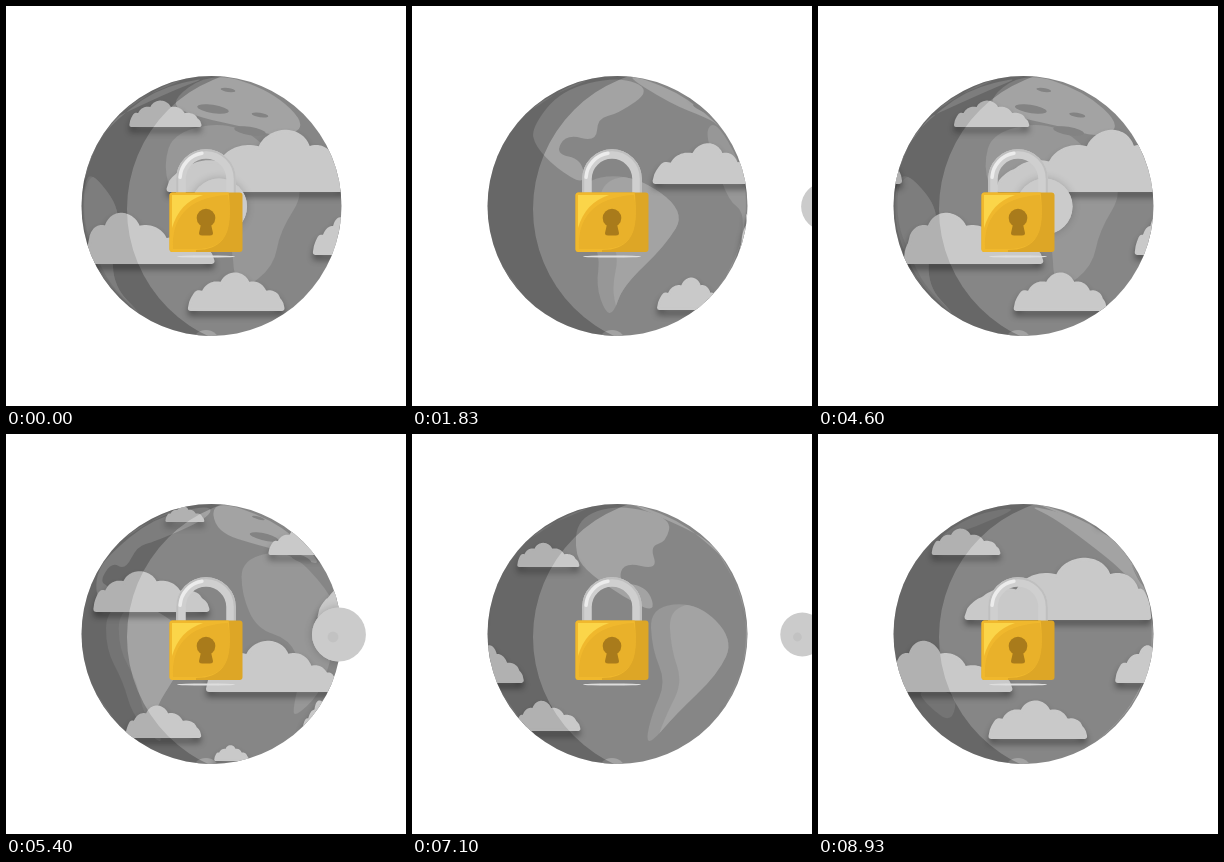
Write an HTML page with a canvas that moves like this. It is 400 by 400 pixels and loops after 9.01 s.

```html
<!DOCTYPE html>
<html lang="en">
<head>
<meta charset="utf-8">
<title>Locked globe</title>
<style>
html, body { margin: 0; width: 100%; height: 100%; overflow: hidden; background: #fff; }
canvas { display: block; width: 400px; height: 400px; }
</style>
</head>
<body>
<canvas id="stage"></canvas>
<script>
const canvas = document.getElementById('stage');
const ctx = canvas.getContext('2d');
const ratio = window.devicePixelRatio || 1;
canvas.width = canvas.height = 400 * ratio;

const LOOP = 9010, TURN = 4.505;
const CX = 205.5, CY = 200, R = 130;
const LAND_SPEED = 41.5, CLOUD_SPEED = 77; // degrees per second
const CLOUD_WRAP = CLOUD_SPEED * TURN;
const RAD = Math.PI / 180;
const OCEAN = '#868686', SEA = '#838383', LAND = '#979797', LAND_LIGHT = '#a3a3a3';

const clamp = (v, lo, hi) => Math.max(lo, Math.min(hi, v));

// Half width of the globe at a height; clouds float on a flatter, wider shell.
const landChord = y => Math.sqrt(Math.max(1, R * R - (y - CY) ** 2));
const cloudChord = y => 10 + Math.sqrt(R * R - 0.64 * (y - CY) ** 2);
const across = (lon, chord) => CX + chord * Math.sin(clamp(lon, -90, 90) * RAD);

// Outline points as seen at the given second, stored as longitude and height.
function land(at, color, points) {
  const globe = points.map(([x, y]) =>
    [Math.asin(clamp((x - CX) / landChord(y), -1, 1)) / RAD - LAND_SPEED * at, y]);
  return { color, globe };
}

function sea(x, y, w) {
  const ring = [];
  for (let a = 0; a < 360; a += 45) {
    ring.push([x + w * Math.cos(a * RAD), y + w * 0.3 * Math.sin(a * RAD + 0.5)]);
  }
  return land(0, SEA, ring);
}

const southAmerica = land(2.595, LAND, [[238, 173], [285, 168], [322, 205], [306, 240],
  [264, 280], [240, 308], [234, 306], [240, 280], [254, 248], [240, 215]]);

const lands = [
  land(0, LAND, [[157, 160], [168, 125], [230, 115], [275, 155], [300, 185], [274, 225],
    [268, 260], [238, 284], [228, 272], [226, 235], [205, 205], [168, 195]]),
  land(0, LAND_LIGHT, [[160, 98], [205, 65], [270, 85], [302, 120], [275, 132], [235, 120], [195, 112]]),
  sea(207, 103, 17), sea(244, 125, 17), sea(254, 109, 9), sea(222, 84, 8),
  land(2.595, LAND_LIGHT, [[165, 84], [210, 70], [260, 84], [254, 108], [238, 112], [246, 136],
    [212, 128], [206, 148], [236, 153], [244, 180], [210, 162], [178, 140], [163, 122]]),
  southAmerica,
  land(4.425, LAND, [[98, 255], [140, 258], [134, 290], [110, 272]]),
  land(4.425, LAND, [[102, 108], [138, 80], [205, 72], [160, 92]])
];

// Centre longitude at the start, base line, width in degrees, place of the peak.
function cloud(lon, base, width, peak = 0.46) {
  return { lon, base, width, peak, height: width * 0.68 };
}

const clouds = [
  cloud(26, 186, 87, 0.57), cloud(-35, 258, 70, 0.38), cloud(-98, 178, 54), cloud(76, 249, 50),
  cloud(14.5, 305, 51), cloud(-97, 304, 43), cloud(107, 297, 40),
  cloud(-23, 121, 35), cloud(113, 133, 32), cloud(-84, 88, 21), cloud(62, 89, 21),
  cloud(-56, 327, 21), cloud(80, 327, 20)
];

// Five equal puffs step down on both sides of the peak, over a flat slab.
function cloudTop(u, { width, height, peak }) {
  const r = 0.24 * height / 0.68 * 1.15;
  let top = height * 0.3;
  for (let i = -2; i <= 2; i++) {
    const d = (u - peak - i * 0.19) * width * 2;
    if (Math.abs(d) < r) {
      top = Math.max(top, height * (1 - 0.27 * Math.abs(i)) - r + Math.sqrt(r * r - d * d));
    }
  }
  return top * Math.min(1, Math.sqrt(Math.min(u, 1 - u) / 0.07));
}

function drawCloud(c, time) {
  let lon = c.lon + CLOUD_SPEED * time;
  lon -= CLOUD_WRAP * Math.round(lon / CLOUD_WRAP);
  if (Math.abs(lon) - c.width / 2 > 90) return;
  const chord = cloudChord(c.base), inset = Math.min(3, c.height * 0.08);
  ctx.beginPath();
  for (let i = 0; i <= 80; i++) {
    const u = i / 80;
    ctx.lineTo(across(lon + (u - 0.5) * c.width, chord), c.base - inset - cloudTop(u, c) * 0.95);
  }
  ctx.closePath();
  ctx.fillStyle = ctx.strokeStyle = '#c9c9c9';
  ctx.lineJoin = 'round';
  ctx.lineWidth = inset * 2;
  setShadow('rgba(0,0,0,.42)', 6, 5);
  ctx.stroke();
  setShadow('transparent', 0, 0);
  ctx.fill();
}

// Smooth closed curve through the midpoints of the outline.
function landPath({ globe }, turn) {
  const pts = globe.map(([lon, y]) => [across(lon + turn, landChord(y)), y]);
  const middle = (a, b) => [(a[0] + b[0]) / 2, (a[1] + b[1]) / 2];
  ctx.beginPath();
  ctx.moveTo(...middle(pts[pts.length - 1], pts[0]));
  pts.forEach((p, i) => ctx.quadraticCurveTo(...p, ...middle(p, pts[(i + 1) % pts.length])));
  ctx.closePath();
}

function drawLand(shape, turn) {
  landPath(shape, turn);
  ctx.fillStyle = shape.color;
  ctx.fill();
}

function disc(x, y, r, color) {
  ctx.fillStyle = color;
  ctx.beginPath();
  ctx.arc(x, y, r, 0, Math.PI * 2);
  ctx.fill();
}

function setShadow(color, blur, dy) {
  ctx.shadowColor = color;
  ctx.shadowBlur = blur * ratio;
  ctx.shadowOffsetY = dy * ratio;
}

// Swings out in front of the globe, then returns faster behind it.
function moon(s) {
  const back = s > 2.03;
  const x = back
    ? 213 + 207 * Math.cos(55 * RAD * (s - 2.03))
    : 213 + 212 * Math.sin(38.5 * RAD * s);
  return { x, r: back ? 22 : 28 - 1.3 * s * s, back, hidden: s > 3.7 };
}

function drawMoon({ x, r }) {
  disc(x, 200.5, r, '#cbcbcb');
  disc(x - r * 0.22, 203, r * 0.2, '#c2c2c2');
}

// Everything left of a large offset circle.
function night(alpha) {
  ctx.fillStyle = `rgba(0,0,0,${alpha})`;
  ctx.beginPath();
  ctx.moveTo(261, 0);
  ctx.lineTo(0, 0);
  ctx.lineTo(0, 400);
  ctx.lineTo(261, 400);
  ctx.arc(261, 203, 140, Math.PI / 2, Math.PI * 1.5);
  ctx.fill();
}

function drawGlobe(time, m) {
  const turn = LAND_SPEED * time;
  ctx.save();
  ctx.beginPath();
  ctx.arc(CX, CY, R, 0, Math.PI * 2);
  ctx.clip();
  ctx.fillStyle = OCEAN;
  ctx.fillRect(0, 0, 400, 400);
  for (const l of lands) drawLand(l, turn);
  // Lit part of the southern continent: its own outline, moved inland.
  ctx.save();
  landPath(southAmerica, turn);
  ctx.clip();
  drawLand({ ...southAmerica, color: LAND_LIGHT }, turn + 9);
  ctx.restore();
  disc(200, 338, 14, LAND_LIGHT);
  night(0.13);
  for (const c of clouds) drawCloud(c, time);
  if (!m.back) {
    setShadow('rgba(0,0,0,.2)', 8, 0);
    drawMoon(m);
    setShadow('transparent', 0, 0);
  }
  night(0.12);
  ctx.restore();
}

function arch(width, color, r) {
  ctx.strokeStyle = color;
  ctx.lineWidth = width;
  ctx.beginPath();
  ctx.moveTo(200 - r, 188);
  ctx.arc(200, 173, r, Math.PI, 0);
  ctx.lineTo(200 + r, 188);
  ctx.stroke();
}

function drawLock() {
  arch(9.5, '#cfcfcf', 25);
  arch(2, '#bfbfbf', 28.8);
  ctx.strokeStyle = '#ececec';
  ctx.lineWidth = 3.5;
  ctx.lineCap = 'round';
  ctx.beginPath();
  ctx.arc(200, 173, 26, Math.PI * 1.02, Math.PI * 1.45);
  ctx.stroke();
  ctx.lineCap = 'butt';

  ctx.save();
  ctx.beginPath();
  ctx.roundRect(163.5, 186.5, 73, 59.5, 3);
  ctx.clip();
  ctx.fillStyle = '#dda626';
  ctx.fillRect(160, 180, 80, 70);
  ctx.fillStyle = '#f0b82d';
  ctx.beginPath();
  ctx.moveTo(160, 250);
  ctx.lineTo(160, 180);
  ctx.lineTo(222, 180);
  ctx.bezierCurveTo(227, 222, 222, 244, 190, 244);
  ctx.lineTo(190, 250);
  ctx.fill();
  ctx.fillStyle = '#e9b12a';
  ctx.beginPath();
  ctx.moveTo(167, 243);
  ctx.bezierCurveTo(165, 214, 180, 191, 222, 189);
  ctx.bezierCurveTo(227, 222, 222, 243, 190, 243);
  ctx.fill();
  ctx.fillStyle = '#fbd549';
  ctx.beginPath();
  ctx.moveTo(166, 189);
  ctx.lineTo(197, 189);
  ctx.bezierCurveTo(181, 194, 171, 205, 166, 222);
  ctx.fill();
  ctx.restore();

  disc(200, 212, 9.3, '#a97b1b');
  ctx.beginPath();
  ctx.moveTo(195.5, 216);
  ctx.lineTo(204.5, 216);
  ctx.lineTo(207, 227);
  ctx.quadraticCurveTo(207, 229.5, 204, 229.5);
  ctx.lineTo(196, 229.5);
  ctx.quadraticCurveTo(193, 229.5, 193, 227);
  ctx.fill();

  ctx.fillStyle = '#dedede';
  ctx.beginPath();
  ctx.ellipse(200, 250.5, 29, 1, 0, 0, Math.PI * 2);
  ctx.fill();
}

// The picture holds between steps at 0 and 30 ms of every 100 ms.
function stepTime(ms) {
  const t = Math.min(ms % LOOP, 8930);
  const start = Math.floor(t / 100) * 100;
  return start + (t - start >= 30 ? 30 : 0);
}

function draw(ms) {
  const time = stepTime(ms) / 1000 % TURN;
  const m = moon(time);
  ctx.setTransform(ratio, 0, 0, ratio, 0, 0);
  ctx.fillStyle = '#fff';
  ctx.fillRect(0, 0, 400, 400);
  if (m.back && !m.hidden) drawMoon(m);
  drawGlobe(time, m);
  if (!m.back) drawMoon(m);
  drawLock();
}

const begin = performance.now();
function tick() {
  draw(performance.now() - begin);
  requestAnimationFrame(tick);
}
tick();
</script>
</body>
</html>
```
